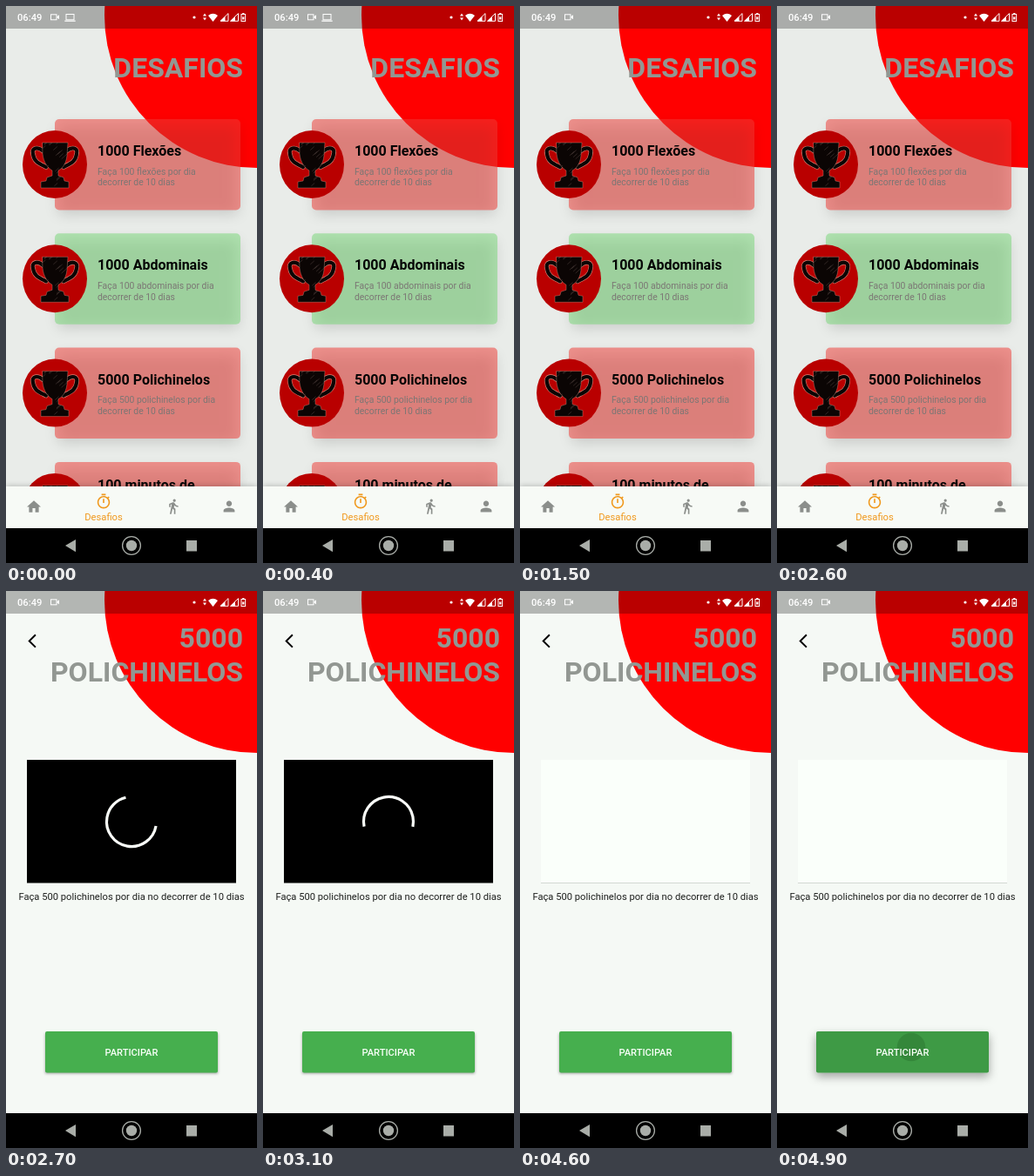
An HTML page with a canvas that plays this animation: 288 px wide and 640 px high, repeating every 5000 ms.

```html
<!DOCTYPE html>
<html lang="pt">
<head>
<meta charset="utf-8">
<title>Desafios</title>
<style>
html, body { margin: 0; width: 100%; height: 100%; overflow: hidden; background: #000; }
canvas { display: block; width: 288px; height: 640px; }
</style>
</head>
<body>
<canvas id="stage"></canvas>
<script>
const W = 288, H = 640, LOOP = 5000;
const OPEN = 2700, LOADED = 3200, PRESS = 4640, LAPTOP_OFF = 1000;
const canvas = document.getElementById('stage');
const ctx = canvas.getContext('2d');
const dpr = window.devicePixelRatio || 1;
canvas.width = W * dpr;
canvas.height = H * dpr;

const ICONS = {
  home: 'M10 20v-6h4v6h5v-8h3L12 3 2 12h3v8z',
  timer: 'M15 1H9v2h6V1zm-4 13h2V8h-2v6zm8.03-6.61l1.42-1.42c-.43-.51-.9-.99-1.41-1.41l-1.42 1.42C16.07 4.74 14.12 4 12 4c-4.97 0-9 4.03-9 9s4.02 9 9 9 9-4.03 9-9c0-2.12-.74-4.07-1.97-5.61zM12 20c-3.87 0-7-3.13-7-7s3.13-7 7-7 7 3.13 7 7-3.13 7-7 7z',
  walk: 'M13.5 5.5c1.1 0 2-.9 2-2s-.9-2-2-2-2 .9-2 2 .9 2 2 2zM9.8 8.9L7 23h2.1l1.8-8 2.1 2v6h2v-7.5l-2.1-2 .6-3C14.8 12 16.8 13 19 13v-2c-1.9 0-3.5-1-4.3-2.4l-1-1.6c-.4-.6-1-1-1.7-1-.3 0-.5.1-.8.1L6 8.3V13h2V9.6l1.8-.7z',
  person: 'M12 12c2.21 0 4-1.79 4-4s-1.79-4-4-4-4 1.79-4 4 1.79 4 4 4zm0 2c-2.67 0-8 1.34-8 4v2h16v-2c0-2.66-5.33-4-8-4z',
  back: 'M11.67 3.87L9.9 2.1 0 12l9.9 9.9 1.77-1.77L3.54 12z'
};
for (const k in ICONS) ICONS[k] = new Path2D(ICONS[k]);

const RED = 'rgba(240,60,54,.52)', GREEN = 'rgba(122,215,122,.52)';
const CARDS = [
  { title: '1000 Flexões', what: '100 flexões', color: RED },
  { title: '1000 Abdominais', what: '100 abdominais', color: GREEN },
  { title: '5000 Polichinelos', what: '500 polichinelos', color: RED },
  { title: '100 minutos de', what: '', color: RED, titleY: 163 }
];

const clamp = (v) => Math.max(0, Math.min(1, v));

function rect(x, y, w, h, color) {
  ctx.fillStyle = color;
  ctx.fillRect(x, y, w, h);
}

function disc(x, y, rx, color, ry = rx) {
  ctx.beginPath();
  ctx.ellipse(x, y, rx, ry, 0, 0, Math.PI * 2);
  ctx.fillStyle = color;
  ctx.fill();
}

function poly(points, color) {
  ctx.beginPath();
  points.forEach(([x, y]) => ctx.lineTo(x, y));
  ctx.closePath();
  ctx.fillStyle = color;
  ctx.fill();
}

function roundRect(x, y, w, h, r, color) {
  ctx.beginPath();
  ctx.roundRect(x, y, w, h, r);
  ctx.fillStyle = color;
  ctx.fill();
}

function text(str, x, y, size, color, weight = 400, align = 'left') {
  ctx.font = `${weight} ${size}px Roboto, sans-serif`;
  ctx.textAlign = align;
  ctx.fillStyle = color;
  ctx.fillText(str, x, y);
}

function icon(name, x, y, color) {
  ctx.save();
  ctx.translate(x, y);
  ctx.scale(.8, .8);
  ctx.fillStyle = color;
  ctx.fill(ICONS[name]);
  ctx.restore();
}

// Draws only the blurred shadow; the caster sits off stage.
function shadow(x, y, w, h, dy, blur, alpha) {
  const off = 1000;
  ctx.save();
  ctx.shadowColor = `rgba(0,0,0,${alpha})`;
  ctx.shadowBlur = blur * dpr;
  ctx.shadowOffsetX = off * dpr;
  ctx.shadowOffsetY = dy * dpr;
  rect(x - off, y, w, h, '#000');
  ctx.restore();
}

function seeded(seed) {
  return () => (seed = (seed * 16807) % 2147483647) / 2147483647;
}

function handle(side) {
  ctx.beginPath();
  ctx.moveTo(side * 13, -15);
  ctx.bezierCurveTo(side * 20, -21, side * 27, -19, side * 25, -12);
  ctx.bezierCurveTo(side * 24, -3, side * 18, -1, side * 10, 3);
}

function trophy(cx, cy) {
  ctx.save();
  ctx.translate(cx, cy);
  ctx.lineCap = ctx.lineJoin = 'round';
  for (const side of [-1, 1]) {
    for (const [w, c] of [[5.4, 'rgba(232,190,170,.7)'], [4.2, '#0b0504']]) {
      handle(side);
      ctx.lineWidth = w;
      ctx.strokeStyle = c;
      ctx.stroke();
    }
  }
  const cup = new Path2D('M-14 -25L15 -25L14 -10C13 0 8 5 4 7L4 13L10 15L11 19L16 20L16 27L-16 27L-16 20L-10 19L-9 15L-3 13L-3 7C-8 4 -13 -2 -14 -12Z');
  ctx.fillStyle = '#0b0504';
  ctx.fill(cup);
  ctx.lineWidth = .7;
  ctx.strokeStyle = 'rgba(225,175,155,.5)';
  ctx.stroke(cup);
  ctx.clip(cup);
  const rnd = seeded(77);
  ctx.lineWidth = .6;
  ctx.strokeStyle = 'rgba(190,165,155,.35)';
  ctx.beginPath();
  for (let i = 0; i < 22; i++) {
    const x = -15 + rnd() * 26, y = -24 + rnd() * 50, len = 3 + rnd() * 6;
    ctx.moveTo(x, y);
    ctx.lineTo(x + len, y - len * .9);
  }
  ctx.stroke();
  ctx.restore();
}

function page(bg) {
  rect(0, 0, W, H, bg);
  disc(288, 11, 175, '#ff0000');
}

function card(c, y) {
  shadow(60, y + 8, 206, 101, 0, 15, .15);
  roundRect(56, y, 213, 104.5, 5, c.color);
  disc(56, y + 52, 37, '#b90000', 39);
  trophy(56, y + 52);
  text(c.title, 105, y + (c.titleY ? 32 : 42), 16, '#050505', 700);
  if (c.what) {
    text(`Faça ${c.what} por dia`, 105, y + 63.5, 10.4, '#7b7674');
    text('decorrer de 10 dias', 105, y + 76.3, 10.4, '#7b7674');
  }
}

function cardLines(c) {
  if (c.what === '100 flexões') c.what = '100 flexões';
}

function list() {
  page('#e9ece9');
  text('DESAFIOS', 272, 82, 32, '#929792', 700, 'right');
  CARDS.forEach((c, i) => card(c, 130 + i * 131.3));
  shadow(0, 552, W, 48, -1, 6, .2);
  rect(0, 552, W, 48, '#f7faf6');
  const grey = '#8b8e8b', orange = '#f0981c';
  icon('home', 22.4, 565.8, grey);
  icon('timer', 102.4, 559.8, orange);
  text('Desafios', 112, 591, 11.2, orange, 400, 'center');
  icon('walk', 182.4, 565.4, grey);
  icon('person', 246.4, 565.4, grey);
}

// cubic-bezier(.4, 0, .2, 1)
function ease(x) {
  let lo = 0, hi = 1, s = .5;
  for (let i = 0; i < 20; i++) {
    s = (lo + hi) / 2;
    const bx = 1.2 * s * (1 - s) ** 2 + .6 * s * s * (1 - s) + s ** 3;
    if (bx < x) lo = s; else hi = s;
  }
  return 3 * s * s * (1 - s) + s ** 3;
}

function spinner(ms) {
  const path = (ms / 1333) % 1, turn = (ms / 2222) % 1;
  const head = ease(clamp(path * 2)), tail = ease(clamp(path * 2 - 1));
  const start = Math.PI * (-.5 + tail * 1.5 + turn * 2 + path * .5);
  const sweep = Math.max((head - tail) * 1.5 * Math.PI, .01);
  ctx.beginPath();
  ctx.arc(144, 265, 28.5, start, start + sweep);
  ctx.lineWidth = 3.2;
  ctx.lineCap = 'butt';
  ctx.strokeStyle = '#fbfffa';
  ctx.stroke();
}

function button(t) {
  const x = 45, y = 506, w = 198, h = 47.5;
  const held = t - PRESS;
  const lift = clamp(held / 100), dim = clamp(held / 200);
  shadow(x, y, w, h, 1.5 + lift * 3, 3 + lift * 7, .35);
  roundRect(x, y, w, h, 2, '#46af4e');
  if (held > 0) {
    ctx.save();
    ctx.beginPath();
    ctx.roundRect(x, y, w, h, 2);
    ctx.clip();
    rect(x, y, w, h, `rgba(0,0,0,${.12 * dim})`);
    disc(154, 524, held * .062, 'rgba(0,40,0,.16)');
    ctx.restore();
  }
  text('PARTICIPAR', 144, 534, 11.1, '#f8fff8', 500, 'center');
}

function detail(t) {
  page('#f5f9f5');
  icon('back', 25.3, 47.8, '#050505');
  text('5000', 272, 65, 32, '#929792', 700, 'right');
  text('POLICHINELOS', 272, 104, 32, '#929792', 700, 'right');
  if (t < LOADED) {
    rect(24, 194, 240, 141.5, '#000');
    spinner(t - OPEN + 435);
  } else {
    rect(24, 194, 240, 141, '#fafffa');
    rect(24, 335, 240, 1, '#d3d7d3');
  }
  text('Faça 500 polichinelos por dia no decorrer de 10 dias', 144, 355, 11.2, '#1e201e', 400, 'center');
  button(t);
}

function statusBar(t) {
  const white = '#fff';
  rect(0, 0, W, 26, 'rgba(0,0,0,.27)');
  text('06:49', 13, 17, 11.2, white, 500);
  ctx.strokeStyle = white;
  ctx.lineWidth = 1;
  ctx.strokeRect(51.5, 9.8, 6.5, 6);
  poly([[58.5, 12], [61, 10.3], [61, 15.3], [58.5, 13.6]], white);
  if (t < LAPTOP_OFF) {
    ctx.strokeRect(69, 9.5, 9, 6.3);
    rect(67.3, 16.6, 12.4, 1.2, white);
  }
  disc(216, 13, 1.6, white);
  poly([[226, 11.5], [228, 8.5], [230, 11.5]], white);
  poly([[226, 13.5], [228, 16.5], [230, 13.5]], white);
  ctx.beginPath();
  ctx.moveTo(237.5, 18);
  ctx.lineTo(232, 11);
  ctx.quadraticCurveTo(237.5, 6.5, 243, 11);
  ctx.fillStyle = white;
  ctx.fill();
  for (const x of [246, 257.5]) {
    ctx.beginPath();
    ctx.moveTo(x, 17.3);
    ctx.lineTo(x + 9, 17.3);
    ctx.lineTo(x + 9, 8.6);
    ctx.closePath();
    ctx.stroke();
    poly([[x, 17.3], [x + 5.5, 17.3], [x + 5.5, 12]], white);
  }
  ctx.strokeRect(270, 9.5, 4.6, 8);
  rect(271.2, 8, 2.2, 1.5, white);
  rect(271.2, 12.5, 2.2, 3, white);
}

function systemBar() {
  const grey = '#a9ada8';
  rect(0, 600, W, 40, '#000');
  poly([[68, 620], [80, 613], [80, 627.3]], grey);
  ctx.beginPath();
  ctx.arc(144, 620, 10.4, 0, Math.PI * 2);
  ctx.strokeStyle = grey;
  ctx.lineWidth = 1.3;
  ctx.stroke();
  disc(144, 620, 6.2, grey);
  rect(207, 614, 12, 12.5, grey);
}

function draw(t) {
  ctx.setTransform(dpr, 0, 0, dpr, 0, 0);
  if (t < OPEN) list(); else detail(t);
  statusBar(t);
  systemBar();
}

const begin = performance.now();
function tick() {
  draw((performance.now() - begin) % LOOP);
  requestAnimationFrame(tick);
}
tick();
</script>
</body>
</html>
```
